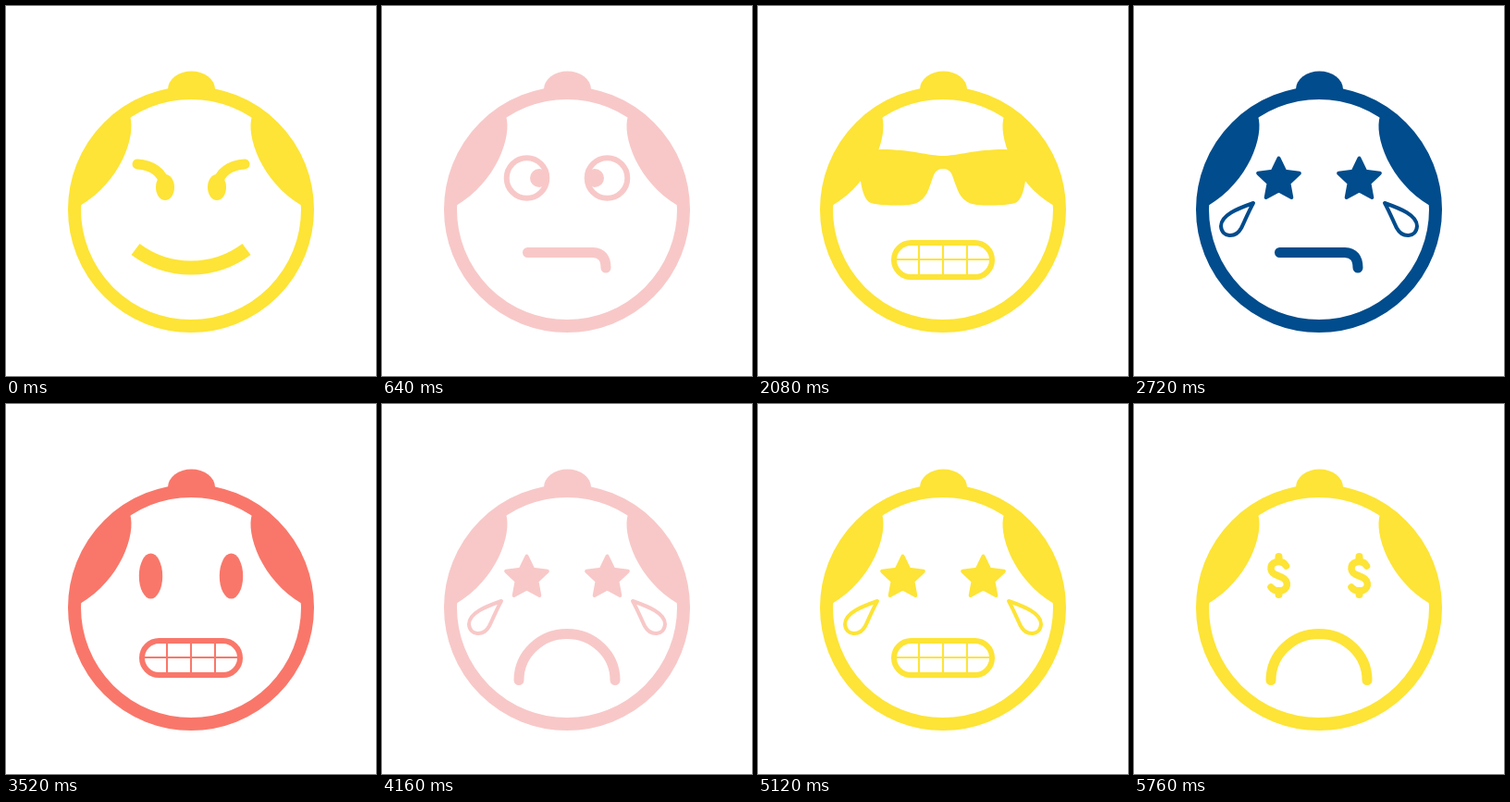
Animation, 400 px wide and 400 px high, one loop 5920 ms. Source, as an HTML page:

```html
<!DOCTYPE html>
<html lang="en">
<head>
<meta charset="utf-8">
<title>Changing faces</title>
<style>
  html, body { margin: 0; width: 100%; height: 100%; overflow: hidden; background: #fff; }
  svg { display: block; width: 100vw; height: 100vh; fill: currentColor; }
  .line { fill: none; stroke: currentColor; }
  .round { stroke-linecap: round; stroke-linejoin: round; }
  .white { fill: #fff; }
</style>
</head>
<body>
<svg id="stage" viewBox="0 0 400 400">
  <circle class="line" cx="200" cy="220" r="126" stroke-width="14"/>
  <path d="M175 97V90A25.5 19.5 0 0 1 226 90V97Z"/>
  <g id="hair"></g>
  <g id="eyes"></g>
  <g id="mouth"></g>
</svg>
<script>
const STEP = 160;
const COLORS = ['#fde436', '#f8c8c8', '#004c8c', '#f9776a'];

// One digit per step: colour, eyes and mouth
const colorOrder = '0230132' + '1022310' + '3102031' + '2310213' + '0312032' + '00';
const eyeOrder   = '0426135' + '0426105' + '3423605' + '1420631' + '4520361' + '26';
const mouthOrder = '0234102' + '3420143' + '2041302' + '4312043' + '1042310' + '24';

const shape = d => `<path d="${d}"/>`;
const line = (d, width) => `<path class="line round" d="${d}" stroke-width="${width}"/>`;
const oval = (x, y, rx, ry, turn = 0, cls = '') =>
  `<ellipse class="${cls}" cx="${x}" cy="${y}" rx="${rx}" ry="${ry}" transform="rotate(${turn} ${x} ${y})"/>`;
const mirror = s => s + `<g transform="matrix(-1 0 0 1 400 0)">${s}</g>`;
const twice = s => s + `<g transform="translate(87)">${s}</g>`;

function star(x, y, outer, inner) {
  let d = '';
  for (let i = 0; i < 10; i++) {
    const r = i % 2 ? inner : outer, a = i * Math.PI / 5;
    d += (i ? 'L' : 'M') + (x + r * Math.sin(a)) + ' ' + (y - r * Math.cos(a));
  }
  return shape(d + 'Z') + line(d + 'Z', 4);
}

const angry = mirror(
  line('M142 171C157 172 169 179 172 194', 11) + oval(172, 196, 10, 14));

const sideways = mirror(
  '<circle class="line" cx="156.5" cy="186" r="21.8" stroke-width="6"/>' +
  oval(170, 186, 10, 10));

const sparkling = twice(
  oval(156.5, 186, 24.7, 24.7) +
  oval(150, 181.5, 10.5, 14, 27, 'white') +
  oval(164, 198, 4.5, 6, 27, 'white'));

const starry = mirror(
  star(156.5, 188, 23.5, 11.5) +
  line('M129 213C112 219 94 226 94 238C95 251 110 251 116 240C119 234 124 222 129 213Z', 4));

const plain = mirror(oval(156.5, 186, 12.7, 24.5));

const shades = mirror(shape(
  'M200.5 162C185 162 165 155 133 155C120 156 106 158 103 160V168' +
  'C104 173 108 175 110 180C111 192 113 206 120 212C128 216 150 216 163 215' +
  'C175 214 182 207 186 194C190 184 190 176 200.5 176Z'));

const dollars = twice(
  line('M164.5 175Q162 170.5 157 170.5C146 170.5 146 181 152 184' +
       'L160 187.5C168 191 167 202 157 202Q151 202 148 198', 7.5) +
  line('M156.5 165V170M156.5 202V206', 8));

const EYES = [angry, sideways, sparkling, starry, plain, shades, dollars];

const smile = '<path class="line" d="M140 263A100 100 0 0 0 260 263" stroke-width="15"/>';
const smirk = line('M157.5 266.5H228Q242 267 242 283', 11);
const laugh = '<path class="line" d="M147 249H253A53 51 0 0 1 147 249Z" stroke-width="7.5"/>';
const teeth =
  '<rect class="line" x="147" y="256" width="106" height="37" rx="18.5" stroke-width="6"/>' +
  '<path class="line" d="M147 274H253M174 256V293M200 256V293M226 256V293" stroke-width="2"/>';
const frown = line('M148 298.5A52 50 0 0 1 252 298.5', 11);

const MOUTHS = [smile, smirk, laugh, teeth, frown];

const $ = id => document.getElementById(id);
$('hair').innerHTML = mirror(shape(
  'M134 119C141 140 124 190 80 216H74A126 126 0 0 1 137 111Z'));

let shown = -1;
function draw(now) {
  const step = Math.floor(now / STEP) % colorOrder.length;
  if (step !== shown) {
    shown = step;
    $('stage').style.color = COLORS[colorOrder[step]];
    $('eyes').innerHTML = EYES[eyeOrder[step]];
    $('mouth').innerHTML = MOUTHS[mouthOrder[step]];
  }
}

const start = performance.now();
function tick() {
  draw(performance.now() - start);
  requestAnimationFrame(tick);
}
tick();
</script>
</body>
</html>
```
